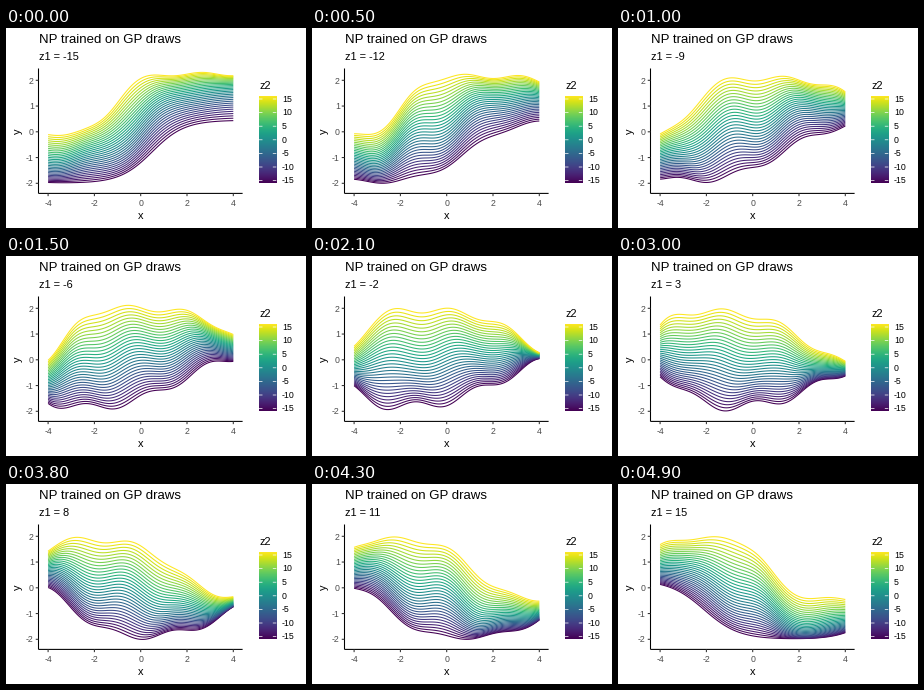
Animation of 300x200 px, one loop 5 s. Source, as a matplotlib script:

```python
import numpy as np
import matplotlib.pyplot as plt
from matplotlib.animation import FuncAnimation

plt.rcParams["font.family"] = "Liberation Sans"

FRAMES, INTERVAL = 50, 100
PX = 0.72  # points per pixel at 100 dpi
LINES = 31
VIRIDIS = plt.get_cmap("viridis")


def step(v):
    return 1 / (1 + np.exp(-v))


def top_edge(x, s):
    """Plateau whose two shoulders slide left as s goes from -1 to 1."""
    calm = 1 - s**2
    left = -4.1 - 1.9 * s + 1.1 * s**2
    right = 2.9 - 2.9 * s + 0.7 * s**2
    plateau = 1.95 - 0.15 * s + 0.15 * s**2
    ripple = (0.06 + 0.06 * calm) * np.cos(2.56 * (x - 0.54 - 2.8 * s))
    return (plateau - 2.35 * step((left - x) / 0.5)
            - 2.4 * step((x - right) / (0.5 + 0.5 * calm)) + ripple)


def low_edge(x, s):
    """Trough whose two shoulders slide right as s goes from -1 to 1."""
    calm = 1 - s**2
    left = -4.1 + 2.6 * s - 0.6 * s**2
    right = 2.7 + 2.5 * s + 0.3 * s**2
    ripple = 0.18 * calm * np.cos(2.4 * (x - 1.8 - 4 * s))
    return (-2 + 2.3 * step((left - x) / 0.75)
            + 2.45 * step((x - right) / (0.7 + 0.7 * calm)) + ripple)


def crowding(x, s):
    """How far the inner curves lean to the top (+) or the bottom (-)."""
    return -0.04 - 0.16 * s * step(2 * (x - 0.8)) + 0.04 * np.sin(2 * x - 6 * s)


def px_x(x):
    return 134.7 + 23.15 * x


def px_y(y):
    return 103.8 - 25.75 * y


fig = plt.figure(figsize=(3, 2), dpi=100, facecolor="white")
ax = fig.add_axes([0, 0, 1, 1])
ax.axis("off")


def text(x, y, label, size, color="black", **kw):
    return ax.text(x, y, label, fontsize=size * PX, color=color, **kw)


def stroke(xs, ys, color="black", width=1.07):
    return ax.plot(xs, ys, color=color, lw=width * PX, snap=False,
                   solid_capstyle="butt")[0]


text(32.8, 15, "NP trained on GP draws", 13.2)
subtitle = text(32.8, 32, "", 11)
text(134.7, 191, "x", 11, ha="center")
text(12, 103.5, "y", 11, rotation=90, ha="center", va="center")

LEFT, RIGHT, UPPER, BOTTOM = 32.5, 236.6, 40.5, 165.4
stroke([LEFT, LEFT], [UPPER, BOTTOM])
stroke([LEFT, RIGHT], [BOTTOM, BOTTOM])
for v in range(-4, 5, 2):
    stroke([px_x(v)] * 2, [BOTTOM, BOTTOM + 2.75], "#333333")
    text(px_x(v), 178, str(v), 8.8, "#4d4d4d", ha="center")
for v in range(-2, 3):
    stroke([LEFT - 2.75, LEFT], [px_y(v)] * 2, "#333333")
    text(27.8, px_y(v) + 3.2, str(v), 8.8, "#4d4d4d", ha="right")

# Colour bar
BAR_L, BAR_R, BAR_T, BAR_B = 253, 270.3, 68.6, 155
text(BAR_L, 61, "z2", 11)
ax.imshow(np.linspace(1, 0, 300)[:, None], cmap=VIRIDIS, aspect="auto",
          extent=(BAR_L, BAR_R, BAR_B, BAR_T))
for v in range(-15, 16, 5):
    y = (BAR_T + BAR_B) / 2 - 2.72 * v
    for x in (BAR_L, BAR_R - 3.46):
        stroke([x, x + 3.46], [y, y], "white", 0.7)
    text(275.8, y + 2.8, str(v), 8.8)

xs = np.linspace(-4, 4, 121)
levels = np.linspace(0, 1, LINES)
curves = [stroke(px_x(xs), 0 * xs, VIRIDIS(u)) for u in levels]
ax.set_xlim(0, 300)
ax.set_ylim(200, 0)


def draw(frame):
    s = 2 * frame / (FRAMES - 1) - 1
    subtitle.set_text(f"z1 = {round(15 * s)}")
    top, low, lean = top_edge(xs, s), low_edge(xs, s), crowding(xs, s)
    for u, curve in zip(levels, curves):
        height = u + 4 * lean * u * (1 - u)
        curve.set_ydata(px_y(low + (top - low) * height))
    return [subtitle, *curves]


anim = FuncAnimation(fig, draw, frames=FRAMES, interval=INTERVAL,
                     init_func=lambda: draw(0), repeat=True, repeat_delay=0)
plt.show()
```
